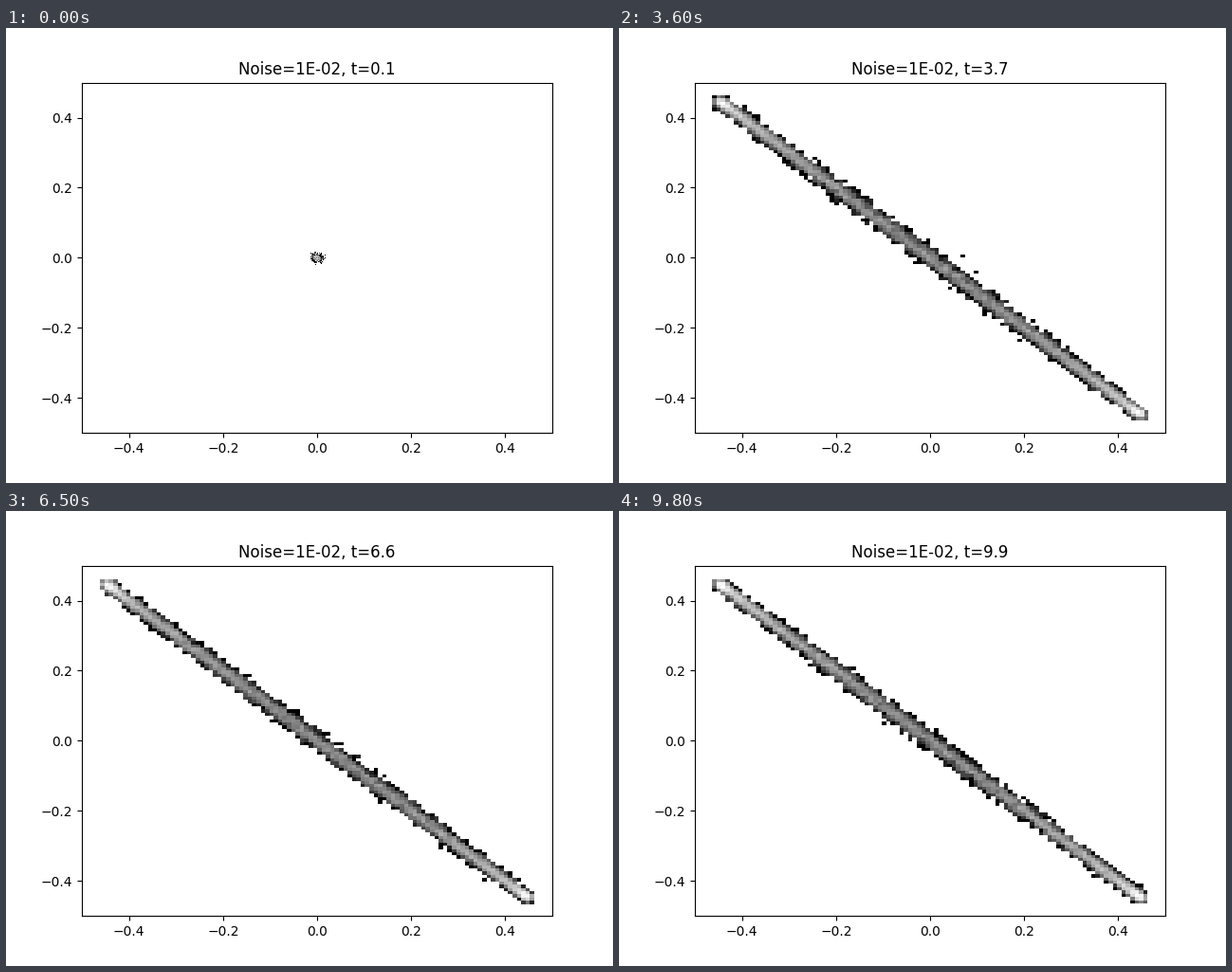
Write a matplotlib script that moves like this. It is 640 px wide and 480 px high and loops after 9900 ms.

```python
import numpy as np
import matplotlib.pyplot as plt
from matplotlib.animation import FuncAnimation
from matplotlib.colors import LogNorm

FRAMES = 99
FRAME_DT = 0.1
SUBSTEPS = 5
PAIRS = 10000
GROWTH = 1.0      # linear growth rate of a single oscillator
COUPLING = 1.1    # pushes the two oscillators into antiphase
AMPLITUDE = 0.447
DIFFUSION = 0.019
OMEGA = 6.0


def simulate():
    """Two coupled noisy oscillators per pair, seen in the rotating frame."""
    rng = np.random.default_rng(4)
    dt = FRAME_DT / SUBSTEPS
    kick = DIFFUSION * np.sqrt(dt)
    damping = (GROWTH + COUPLING) / AMPLITUDE**2
    z = np.zeros((2, PAIRS), dtype=complex)
    states = []
    for frame in range(FRAMES):
        for _ in range(SUBSTEPS):
            noise = rng.standard_normal((2, 2, PAIRS))
            gain = GROWTH - damping * (z.real**2 + z.imag**2)
            z = z + dt * (gain * z - COUPLING * z[::-1])
            z += kick * (noise[0] + 1j * noise[1])
        t = (frame + 1) * FRAME_DT
        states.append((z * np.exp(1j * OMEGA * t)).real)
    return states


states = simulate()
fig, ax = plt.subplots(figsize=(6.4, 4.8), dpi=100)


def draw(frame):
    ax.clear()
    x, y = states[frame]
    ax.hist2d(x, y, bins=100, norm=LogNorm(), cmap="gray")
    ax.set_xlim(-0.5, 0.5)
    ax.set_ylim(-0.5, 0.5)
    ax.set_title(f"Noise=1E-02, t={(frame + 1) * FRAME_DT:.1f}")


anim = FuncAnimation(fig, draw, frames=FRAMES, init_func=lambda: None,
                     interval=100, repeat=True, repeat_delay=0)
plt.show()
```
